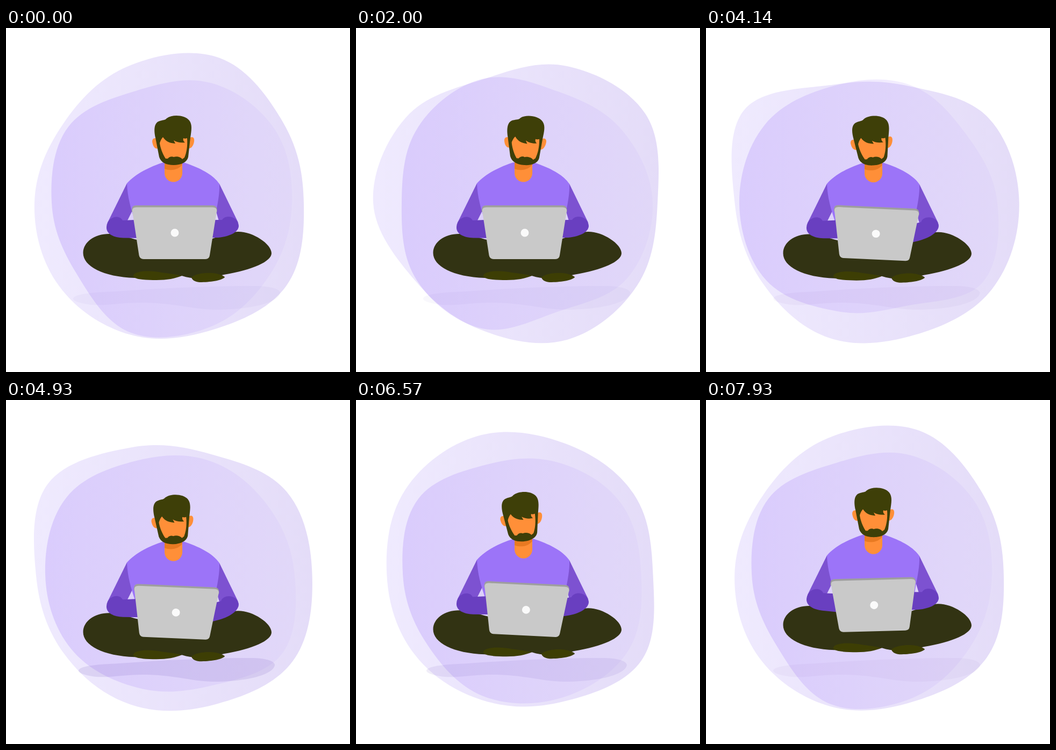
Recreate the animation shown at these times as an HTML page. Size 640x640 px, loop 8000 ms.

```html
<!DOCTYPE html>
<html lang="en">
<head>
<meta charset="utf-8">
<title>Working on a laptop</title>
<style>
  html, body { margin: 0; width: 100%; height: 100%; overflow: hidden; background: #fff; }
  svg { display: block; width: 100%; height: 100%; }
</style>
</head>
<body>
<svg viewBox="0 0 640 640">
  <defs>
    <linearGradient id="pale">
      <stop offset="0" stop-color="#efeafe"/>
      <stop offset="1" stop-color="#e4dcf8"/>
    </linearGradient>
    <linearGradient id="violet">
      <stop offset="0" stop-color="#9c74f9" stop-opacity=".25"/>
      <stop offset="1" stop-color="#9c74f9" stop-opacity=".05"/>
    </linearGradient>
  </defs>
  <path id="outer" fill="url(#pale)"/>
  <path id="inner" fill="url(#violet)"/>
  <path id="shadow" fill="#6440b0" d="M125 503C128 494 165 492 205 490C290 484 380 480 455 480C490 479 510 485 510 493C508 508 470 522 400 524C350 525 325 513 260 511C215 510 190 517 160 515C140 513 124 508 125 503Z"/>
  <g id="man">
    <g fill="#7d52d1">
      <path d="M225 289L189 362H224L235 340L240 300Z"/>
      <path d="M397 290L432 362H397L391 342L385 300Z"/>
    </g>
    <path fill="#9c74f8" d="M293 250C265 259 240 272 225 289C226 315 232 335 241 362H388C391 335 398 315 397 290C385 272 358 259 330 250Z"/>
    <path fill="#ff8f38" d="M295 245H328V270A16.500 16.500 0 0 1 295 270Z"/>
    <path fill="#e87a22" d="M295 248H328V254C322 263 308 267 295 262Z"/>
    <g id="head">
      <g fill="#ff8f38">
        <path d="M281 206C274 203 271 208 272.500 214C274 222 279 226 283 224Z"/>
        <path d="M342 204C348 201 351 205 350 211C349 219 344 225 340 224Z"/>
      </g>
      <path fill="#3e3f08" d="M278 204C275 190 275 176 286 173C291 171 296 172 299 168C310 160 333 162 341 172C347 180 345 190 343 204L339 240C337 250 325 255 312 255C298 255 288 250 285 240Z"/>
      <path fill="#ff8f38" d="M292 203C298 212 305 214 315 215L312 209C318 213 326 214 333 213C330 211 329 208 330 205C333 206 333 206 337 205C338 220 336 232 332 241L328 244C325 240 318 238 312 240C308 238 303 240 301 243L297 243C291 234 287 222 286 214C288 208 290 205 292 203Z"/>
    </g>
    <path fill="#323313" d="M143.500 418C144 398 165 382 195 383C225 386 240 396 260 396H370C395 390 410 379 432 379C460 379 494 402 494 419C494 434 460 450 405 459C380 466 352 469 327 461C305 466 275 468 240 465C180 463 143 443 143.500 418Z"/>
    <g fill="#3d3e04">
      <path d="M237 460C240 452 265 450 290 455C305 457 320 459 327 461C315 466 300 469 280 469C260 469 235 468 237 460Z"/>
      <path d="M345 464C352 457 370 455 385 456C395 457 407 461 407 464C400 470 380 473 360 473C350 472 346 468 345 464Z"/>
    </g>
    <g fill="#693fc0">
      <path id="leftArm" d="M187 370C188 351 211 346 217 358L262 356V391L218 390.500C200 390 186 383 187 370Z"/>
      <path id="rightArm" d="M433 368C432 350 408 346 402 357H350V391L390 390C415 389 433 380 433 368Z"/>
    </g>
    <g id="laptop">
      <path fill="#9e9e9e" d="M234 342V338Q234 330 242 330H384Q392 330 392.500 338V342Z"/>
      <path fill="#c9c9c9" d="M235 341Q234 333.500 243 333.500H384Q393 333.500 392 341L379 423Q378 430 371 430H256Q249 430 247.500 423Z"/>
      <circle cx="314" cy="381" r="7.500" fill="#fafafa"/>
    </g>
  </g>
</svg>
<script>
const LOOP = 8000, CX = 310, CY = 325;
const $ = id => document.getElementById(id);
const wave = (t, period) => Math.sin(2 * Math.PI * t / period);
const mix = (a, b, p) => a + (b - a) * p;

// Each blob melts through four poses, one every quarter loop.
// A pose is the blob's radius in ten directions, clockwise from the right.
const outer = [
  [244, 262, 248, 258, 262, 257, 251, 267, 283, 254],
  [251, 263, 268, 249, 247, 278, 269, 241, 267, 282],
  [275, 274, 259, 266, 254, 257, 296, 228, 226, 268],
  [242, 277, 248, 240, 245, 251, 277, 273, 246, 256]
];
const inner = [
  [222, 225, 241, 254, 222, 225, 240, 219, 234, 234],
  [242, 240, 213, 246, 244, 225, 240, 242, 217, 229],
  [233, 253, 199, 211, 247, 250, 248, 230, 231, 215],
  [220, 249, 240, 231, 219, 222, 240, 214, 213, 223]
];

// Head turns: [time, degrees]
const nods = [[0, 0], [1000, 3.8], [3000, 3.8], [4250, -3.3], [5600, 0], [6500, -3.8], [7900, 0], [LOOP, 0]];

function headAngle(t) {
  const i = nods.findIndex(n => n[0] > t);
  const [t0, a] = nods[i - 1], [t1, b] = nods[i];
  const p = (t - t0) / (t1 - t0);
  return mix(a, b, p * p * (3 - 2 * p));
}

function blob(poses, t) {
  const q = t / LOOP * poses.length, i = Math.floor(q);
  const next = poses[(i + 1) % poses.length];
  const n = next.length, step = 2 * Math.PI / n;
  const pts = poses[i].map((r, k) => {
    const len = mix(r, next[k], q - i);
    return [CX + len * Math.cos(k * step), CY + len * Math.sin(k * step)];
  });
  // Handle length that makes equal radii a true circle
  const pull = 2 / 3 * Math.tan(step / 4) / Math.sin(step);
  const at = k => pts[(k + n) % n];
  const handle = (k, dir) => at(k).map((v, c) => v + dir * pull * (at(k + 1)[c] - at(k - 1)[c]));
  return 'M' + pts[0] + pts.map((_, k) => `C${handle(k, 1)} ${handle(k + 1, -1)} ${at(k + 1)}`).join('') + 'Z';
}

// Rotate about (x, y), optionally squashing the height towards it
function turn(id, angle, x, y, height = 1) {
  $(id).setAttribute('transform', `translate(${x} ${y}) rotate(${angle}) scale(1 ${height}) translate(${-x} ${-y})`);
}

function draw(t) {
  const drop = (1 - Math.cos(t * Math.PI / 1000)) / 2;
  const tilt = 2.9 * wave(t, 800);

  $('outer').setAttribute('d', blob(outer, t));
  $('inner').setAttribute('d', blob(inner, t));
  $('man').setAttribute('transform', `translate(0 ${13.4 * drop})`);
  $('shadow').setAttribute('transform', `translate(317.5 0) scale(${1 - 0.052 * drop} 1) translate(-317.5 0)`);
  $('shadow').setAttribute('opacity', 0.045 + 0.08 * drop);
  turn('head', headAngle(t), 311, 268);
  turn('laptop', tilt, 313, 430, 1 - 0.008 * Math.abs(tilt));
  turn('leftArm', 3.3 * Math.max(0, -tilt), 204, 372);
  turn('rightArm', -15 * Math.max(0, wave(t, 400)), 418, 368);
}

const start = performance.now();
function frame() {
  draw((performance.now() - start) % LOOP);
  requestAnimationFrame(frame);
}
frame();
</script>
</body>
</html>
```
